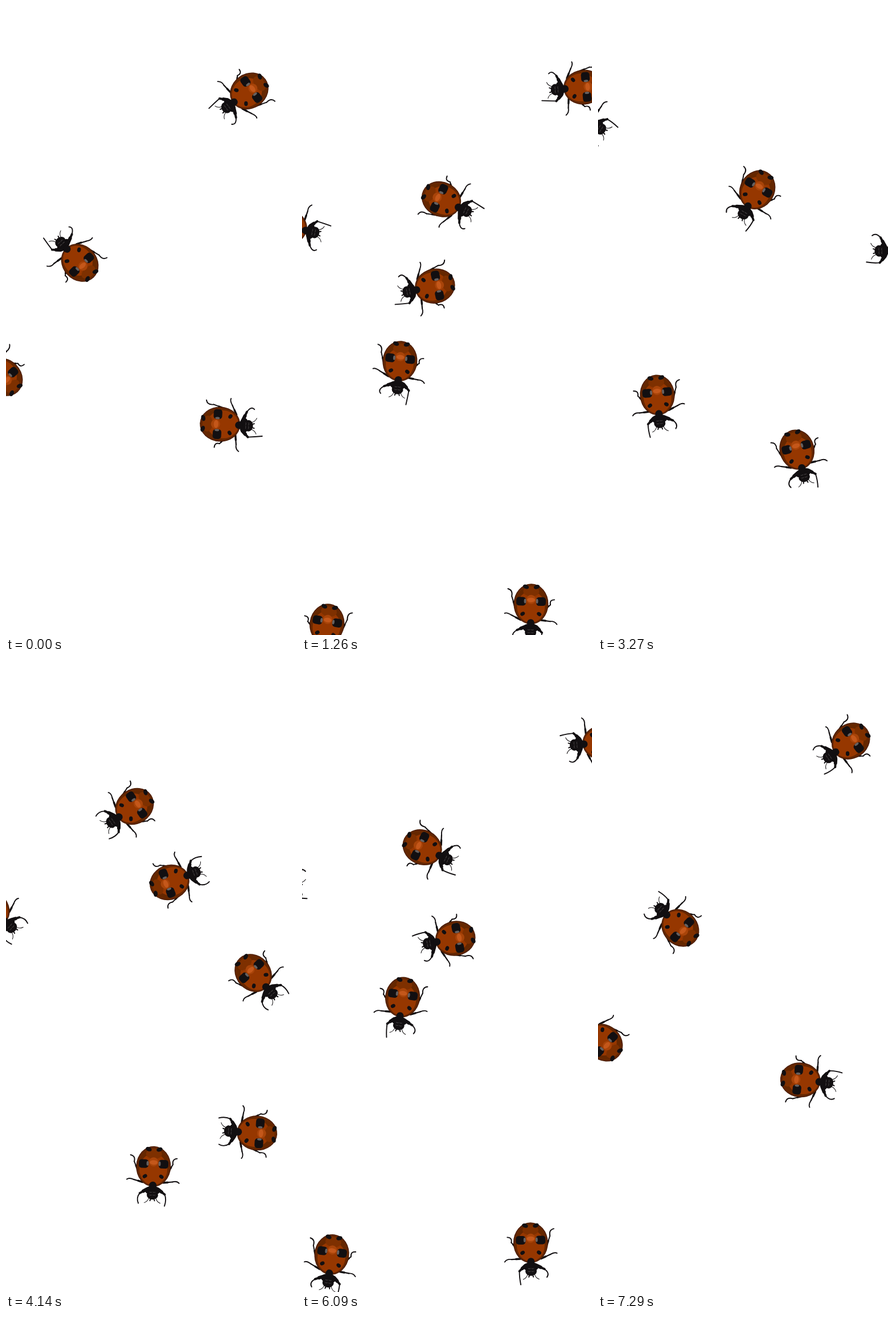
An HTML page with a canvas for the animation above (7320 ms loop, 509 px wide and 1101 px high).

```html
<!DOCTYPE html>
<html lang="en">
<head>
<meta charset="utf-8">
<title>Ladybirds</title>
<style>
  html, body { margin: 0; width: 100%; height: 100%; overflow: hidden; background: #fff; }
  canvas { display: block; }
</style>
</head>
<body>
<canvas id="stage" width="509" height="1101"></canvas>
<script>
const ctx = document.getElementById('stage').getContext('2d');
const PERIOD = 2440;   // the walk repeats three times per 7320 ms
const STRIDES = 29;    // leg cycles per period
const SPEED = 0.67;    // px per ms before the first and after the last point
const INK = '#120f11';
const bugs = [];

const point = (time, x, y, degrees) => ({ time, x, y, angle: degrees * Math.PI / 180 });
const walk = (phase, ...path) => bugs.push({ phase, path });

walk(0, point(1260, 495, 142, 175), point(2040, 70, 415, 123));
walk(0, point(830, -37, 188, 33), point(1260, 244, 338, 25), point(2040, 530, 748, 65));
walk(0, point(1260, -27, 386, 12), point(2040, 490, 273, -47));
walk(0, point(830, 544, 427, 178), point(1260, 234, 490, 168));
walk(0, point(830, 280, 321, 120), point(1260, 172, 621, 95), point(2040, 325, 1083, 90));
walk(0, point(130, 522, 325, 133), point(830, 349, 776, 75), point(1260, 402, 1046, 91));
walk(.5, point(0, 428, 148, 144), point(130, 325, 293, 143), point(830, 104, 680, 85), point(1260, 44, 1081, 99));
walk(0, point(2040, 395, 527, 183), point(2440, 130, 450, 227));
walk(.5, point(2040, 214, 807, 184), point(2440, -3, 650, 227));
walk(.5, point(2040, 142, 582, 42), point(2440, 375, 732, 3));

function ahead({ x, y, angle }, distance) {
  return { x: x + distance * Math.cos(angle), y: y + distance * Math.sin(angle), angle };
}

// Straight outside the path; inside, a curve that leaves and arrives along the heading.
function pose(path, t) {
  const first = path[0], last = path[path.length - 1];
  if (t <= first.time) return ahead(first, (t - first.time) * SPEED);
  if (t >= last.time) return ahead(last, (t - last.time) * SPEED);
  const i = path.findIndex(p => p.time > t), a = path[i - 1], b = path[i];
  const u = (t - a.time) / (b.time - a.time);
  const chord = Math.hypot(b.x - a.x, b.y - a.y);
  const ease = u * u * (3 - 2 * u);
  const from = ahead(a, u * (1 - u) ** 2 * chord);
  const to = ahead(b, u * u * (u - 1) * chord);
  return {
    x: from.x * (1 - ease) + to.x * ease + (from.x - a.x) * ease + (to.x - b.x) * (1 - ease),
    y: from.y * (1 - ease) + to.y * ease + (from.y - a.y) * ease + (to.y - b.y) * (1 - ease),
    angle: a.angle + (b.angle - a.angle) * u
  };
}

function oval(x, y, rx, ry, color, tilt = 0) {
  ctx.fillStyle = color;
  ctx.beginPath();
  ctx.ellipse(x, y, rx, ry, tilt, 0, Math.PI * 2);
  ctx.fill();
}

function curve(width, color, start, bend, end) {
  ctx.lineWidth = width;
  ctx.strokeStyle = color;
  ctx.beginPath();
  ctx.moveTo(...start);
  ctx.quadraticCurveTo(...bend, ...end);
  ctx.stroke();
}

// A tapering thigh and a thin bent shin.
function leg(thick, root, knee, bend, tip) {
  const mid = root.map((v, i) => (v + knee[i]) / 2);
  curve(thick, INK, root, mid, mid);
  curve(thick * .65, INK, mid, knee, knee);
  curve(1.9, INK, knee, bend, tip);
}

// Runs the drawing on both sides of the long axis.
function mirrored(draw) {
  for (const side of [-1, 1]) {
    ctx.save();
    ctx.scale(1, side);
    draw(side);
    ctx.restore();
  }
}

function drawLegs(swing) {
  mirrored(side => {
    const s = -side * swing;
    leg(6, [40, 10], [48 + 2 * s, 22 - 2 * s], [57 + 4 * s, 27 - 8 * s], [67 + 8 * s, 23 - 6 * s]);
    leg(3.4, [28, 18], [25 + 5 * s, 34], [22 + 7 * s, 42], [26 + 9 * s, 46]);
    leg(3, [6, 28], [-6 + 7 * s, 34], [-16 + 8 * s, 32], [-17 + 9 * s, 41]);
  });
}

function drawShell() {
  oval(0, 0, 35.5, 30.5, '#4a1c04');
  oval(0, 0, 34.3, 29, '#652700');
  oval(5, 0, 27.5, 24.5, '#963700');
  oval(-22, 0, 9, 14, '#7e3000');
  oval(-8, 0, 8, 8, '#a84409');
  oval(-7, 0, 4, 7, '#c4571a');
  mirrored(() => {
    ctx.fillStyle = INK;
    ctx.beginPath();
    ctx.roundRect(-12, 9, 15, 17, 5);
    ctx.fill();
    oval(-5, 10.5, 4, 2, '#66605f');
    oval(-30, 9.5, 3.6, 5.4, INK, .35);
    oval(17.5, 14.5, 3.2, 4.2, INK, -.6);
  });
}

function drawHead() {
  oval(42, 0, 8, 13.5, INK);
  oval(50, 0, 8, 10, INK);
  oval(33, 0, 6.5, 6.5, INK);
  mirrored(() => {
    curve(1, INK, [55, 6], [62, 8], [64, 14]);
    curve(2, INK, [55, 3], [58, 3], [60, 4]);
    for (const x of [45, 50]) curve(1, '#454142', [x, 1], [x + 1, 3], [x, 5]);
  });
}

function drawBug({ x, y, angle }, swing) {
  ctx.save();
  ctx.translate(x, y);
  ctx.rotate(angle);
  drawLegs(swing);
  drawShell();
  drawHead();
  ctx.restore();
}

function frame(now) {
  const t = now % PERIOD;
  ctx.clearRect(0, 0, 509, 1101);
  ctx.lineCap = ctx.lineJoin = 'round';
  for (const { phase, path } of bugs) {
    const swing = Math.cos((t / PERIOD * STRIDES + phase) * Math.PI * 2);
    for (const shift of [-PERIOD, 0, PERIOD]) drawBug(pose(path, t + shift), swing);
  }
}

const start = performance.now();
function tick() {
  frame(performance.now() - start);
  requestAnimationFrame(tick);
}
tick();
</script>
</body>
</html>
```
